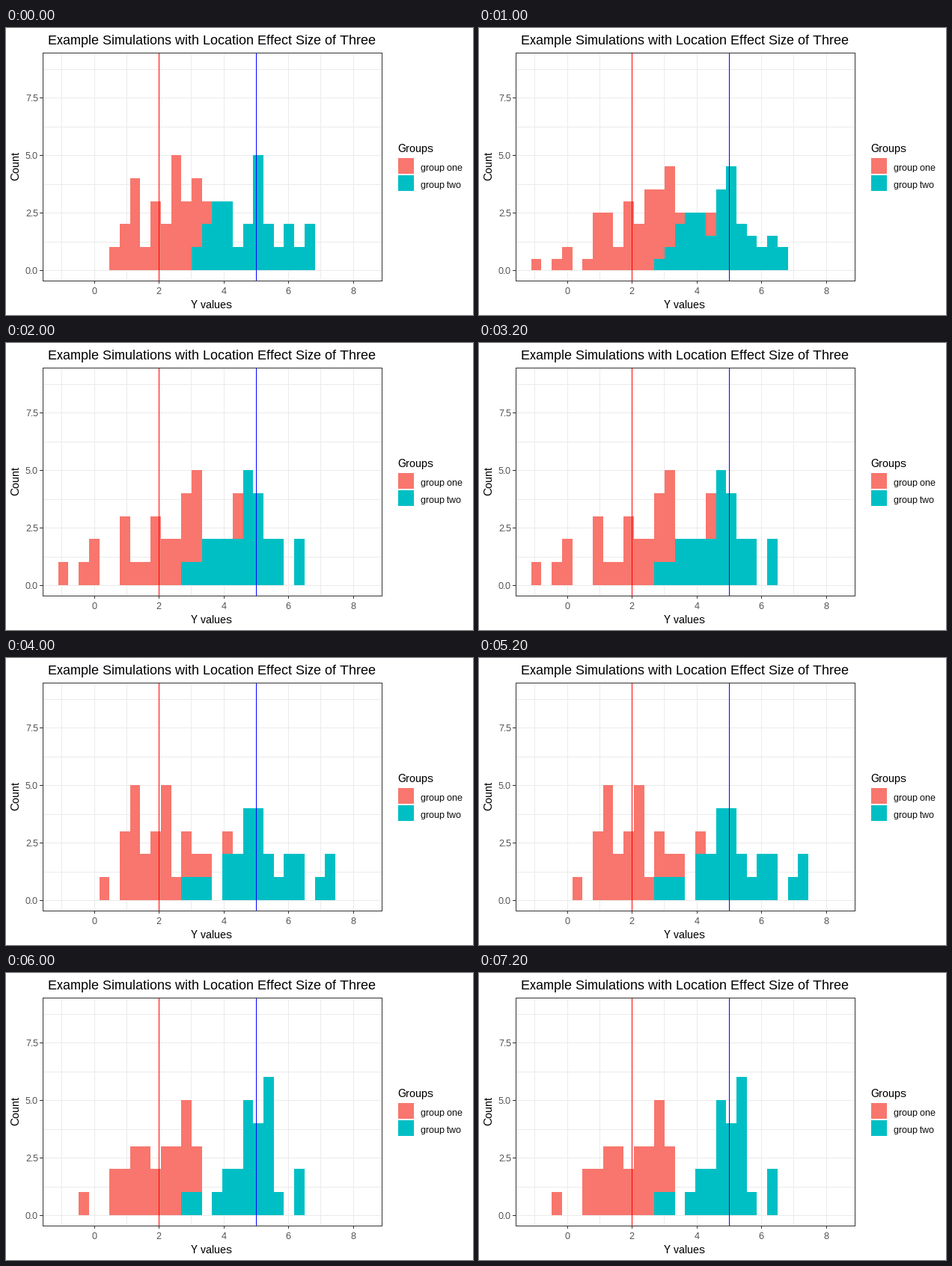
Recreate the animation shown at these times as a matplotlib script. Size 624 by 384 pixels, loop 8000 ms.

```python
import matplotlib.pyplot as plt
import numpy as np
from matplotlib.animation import FuncAnimation
from matplotlib.patches import Rectangle

W, H, DPI = 624, 384, 96
RED, TEAL = "#F8766D", "#00BFC4"
GRID, DARK, GREY = "#EBEBEB", "#333333", "#4D4D4D"
LEFT, RIGHT, TOP, BOTTOM = 49, 502, 33, 338
BINS = 27

# Whole-pixel glyph hinting, no kerning
plt.rcParams.update({
    "font.family": "Liberation Sans",
    "text.hinting": "native",
    "text.hinting_factor": 1,
    "text.kerning_factor": 6,
})

fig = plt.figure(figsize=(W / DPI, H / DPI), dpi=DPI, facecolor="white")
ax = fig.add_axes([0, 0, 1, 1])
ax.set_xlim(0, W)
ax.set_ylim(H, 0)
ax.axis("off")


def px(value):
    return int(np.floor(value + 0.5))


def x_pos(value):
    return 117.5 + 43.25 * value


def y_pos(count):
    return 324 - 30.8 * count


def box(x, y, w, h, color, z=1):
    patch = Rectangle((x, y), w, h, facecolor=color, linewidth=0,
                      antialiased=False, zorder=z)
    return ax.add_patch(patch)


def label(x, y, text, size, color="black", ha="left", **kw):
    ax.text(x, y, text, fontsize=size * 72 / DPI, color=color, ha=ha,
            va="baseline", **kw)


def hist(start, counts):
    full = np.zeros(BINS)
    full[start:start + len(counts)] = counts
    return full


# Each sample: counts of group one, counts of group two
samples = np.array([
    [hist(5, [1, 2, 4, 1, 3, 2, 5, 3, 4, 3, 0, 0, 1]),
     hist(13, [1, 2, 3, 3, 1, 2, 5, 2, 1, 2, 1, 2])],
    [hist(0, [1, 0, 1, 2, 0, 0, 3, 1, 1, 3, 2, 2, 4, 5, 2, 0, 0, 4]),
     hist(12, [1, 1, 2, 2, 2, 2, 5, 4, 2, 2, 0, 2])],
    [hist(4, [1, 0, 3, 5, 2, 3, 5, 1, 3, 2, 2, 0, 3]),
     hist(12, [1, 1, 1, 0, 2, 2, 4, 4, 2, 1, 2, 2, 0, 1, 2])],
    [hist(2, [1, 0, 0, 2, 2, 3, 3, 2, 3, 3, 5, 3]),
     hist(12, [1, 1, 0, 1, 2, 2, 5, 4, 6, 1, 0, 2])],
])
# Sample shown in each second; a half is a blend of two neighbours
steps = [0, 0.5, 1, 1, 2, 2, 3, 3]

# Grid
for value in range(-1, 9):
    box(px(x_pos(value)), TOP, 1, BOTTOM - TOP, GRID)
for k in range(8):
    box(LEFT, px(y_pos(1.25 * k)), RIGHT - LEFT, 1, GRID)

# Bars
edges = [px(69.7 + 13.715 * i) for i in range(BINS + 1)]
bars = [[box(a, 324, b - a, 0, color, z)
         for a, b in zip(edges, edges[1:])]
        for z, color in ((2, RED), (3, TEAL))]

# Group locations
box(px(x_pos(2)), TOP, 1, BOTTOM - TOP, "#FF0000", 4)
box(px(x_pos(5)), TOP, 1, BOTTOM - TOP, "#0000FF", 4)

# Panel border
for y in (TOP, BOTTOM):
    box(LEFT, y, RIGHT - LEFT + 1, 1, DARK, 5)
for x in (LEFT, RIGHT):
    box(x, TOP, 1, BOTTOM - TOP + 1, DARK, 5)

# Axes
for value in range(0, 9, 2):
    x = px(x_pos(value))
    box(x, BOTTOM + 1, 1, 3, DARK, 5)
    label(x, 356, str(value), 12, GREY, "center")
for count in (0, 2.5, 5, 7.5):
    y = px(y_pos(count))
    box(LEFT - 4, y, 4, 1, DARK, 5)
    label(43, y + 5, f"{count:.1f}", 12, GREY, "right")

label(275, 22, "Example Simulations with Location Effect Size of Three", 18,
      ha="center")
label(274.5, 375, "Y values", 15, ha="center")
ax.text(20, 185, "Count", fontsize=15 * 72 / DPI, rotation=90,
        ha="right", va="center")

# Legend
label(523, 166, "Groups", 15)
for y, color, name in ((174, RED, "group one"), (197, TEAL, "group two")):
    box(524, y, 21, 21, color)
    label(554, y + 17, name, 12)


def draw(i):
    step = steps[i]
    low = int(step)
    high = min(low + 1, len(samples) - 1)
    mix = step - low
    counts = samples[low] * (1 - mix) + samples[high] * mix
    for group, heights in zip(bars, counts):
        for bar, count in zip(group, heights):
            top = px(y_pos(count))
            bar.set_y(top)
            bar.set_height(324 - top)
    return [bar for group in bars for bar in group]


anim = FuncAnimation(fig, draw, frames=len(steps), interval=1000,
                     init_func=lambda: draw(0), repeat=True, repeat_delay=0)
plt.show()
```
